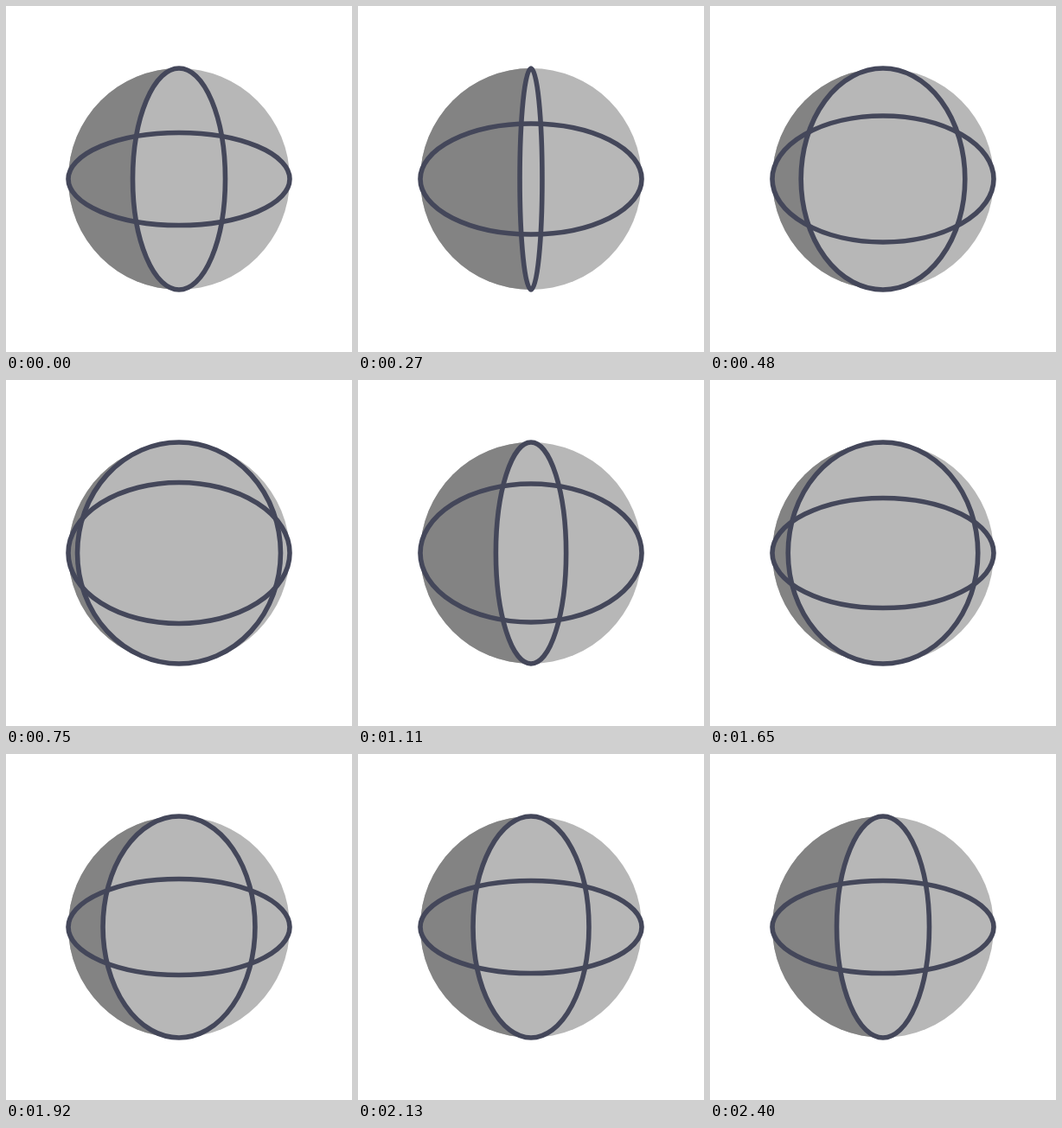
Write an HTML page that moves like this. It is 400 px wide and 400 px high and loops after 2460 ms.

```html
<!DOCTYPE html>
<html lang="en">
<head>
<meta charset="utf-8">
<title>Turning sphere</title>
<style>
  html, body { margin: 0; width: 100%; height: 100%; overflow: hidden; background: #fff; }
  svg { display: block; width: 100%; height: 100%; }
  .light { fill: #b7b7b7; }
  .dark { fill: #838383; }
  .line { stroke: #44475a; stroke-width: 5.6; }
</style>
</head>
<body>
<svg viewBox="0 0 400 400">
  <circle class="light" cx="200" cy="200" r="128"/>
  <path class="dark" d="M200 72A128 128 0 0 0 200 328Z"/>
  <ellipse id="meridian" class="light line" cx="200" cy="200" rx="53.5" ry="128"/>
  <ellipse id="equator" class="line" fill="none" cx="200" cy="200" rx="128" ry="53.5"/>
</svg>
<script>
const R = 128, LOOP = 2460, END = 2400, STEP = 30;
const times = [0, 270, 750, 1110, 1380, 1920, END];
const spin = [24.7, -5.8, -113.4, -198.5, -267, -316.6, -335.3]; // degrees
const tilt = [53.5, 64, 81.5, 80, 73, 55.5, 53.5];               // half height

// Smooth curve through the points, at rest at both ends.
function curve(xs, ys) {
  const last = xs.length - 1;
  const gap = i => xs[i + 1] - xs[i];
  const rate = i => (ys[i + 1] - ys[i]) / gap(i);
  const slope = xs.map((_, i) => i === 0 || i === last ? 0 :
    (rate(i - 1) * gap(i) + rate(i) * gap(i - 1)) / (gap(i - 1) + gap(i)));
  return x => {
    let i = 0;
    while (i < last - 1 && x >= xs[i + 1]) i++;
    const h = gap(i), u = (x - xs[i]) / h, v = 1 - u;
    return v * v * ((1 + 2 * u) * ys[i] + u * h * slope[i]) +
           u * u * ((1 + 2 * v) * ys[i + 1] - v * h * slope[i + 1]);
  };
}

const spinAt = curve(times, spin);
const tiltAt = curve(times, tilt);
const meridian = document.getElementById('meridian');
const equator = document.getElementById('equator');
const start = performance.now();

function draw(now) {
  const elapsed = Math.max(0, now - start) % LOOP;
  const t = Math.min(END, Math.floor(elapsed / STEP) * STEP);
  const rx = R * Math.abs(Math.sin(spinAt(t) * Math.PI / 180));
  meridian.setAttribute('rx', Math.max(0.1, rx).toFixed(2));
  equator.setAttribute('ry', tiltAt(t).toFixed(2));
  requestAnimationFrame(draw);
}
draw(start);
</script>
</body>
</html>
```
